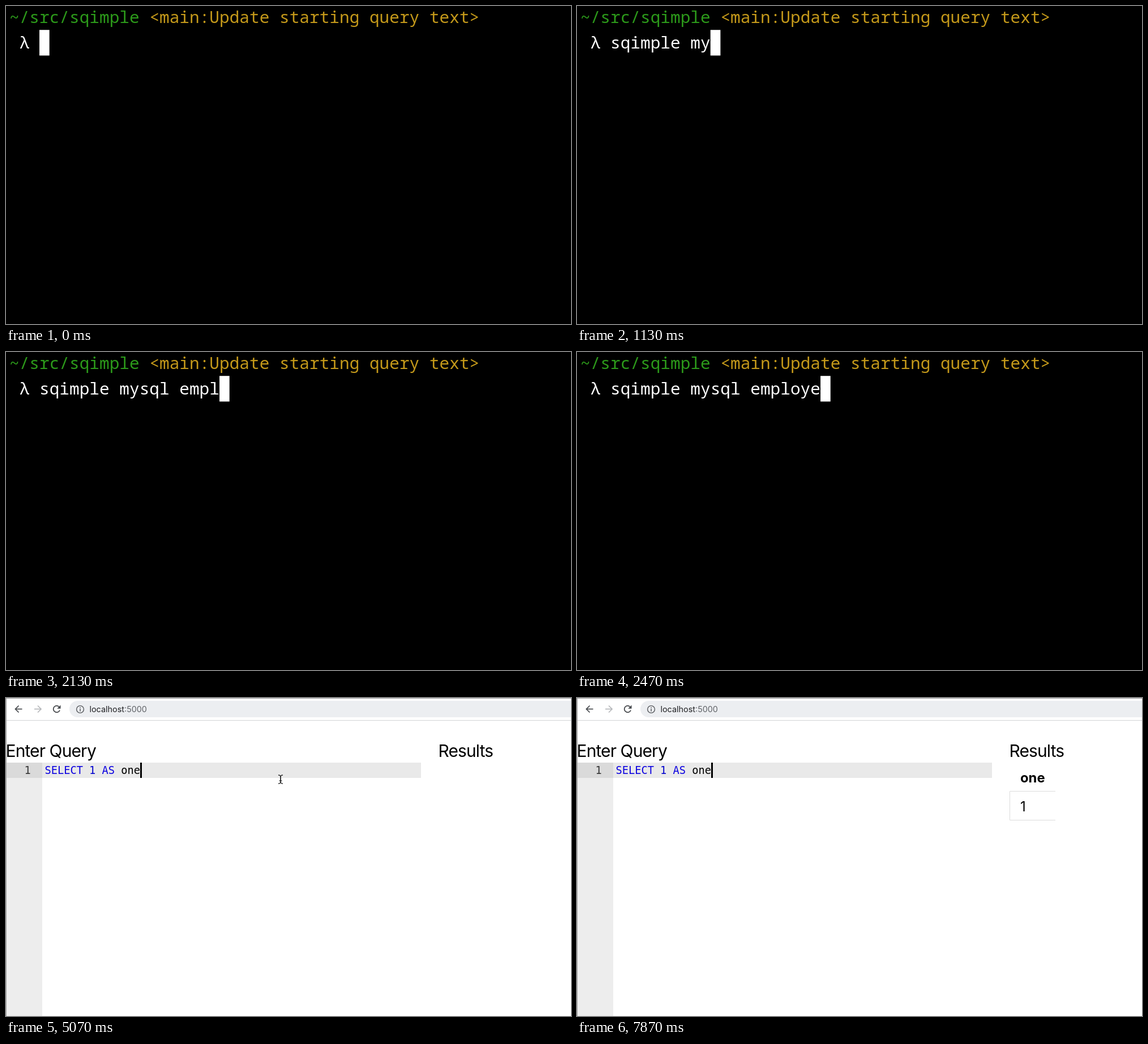
Write an HTML page with a canvas that moves like this. It is 998 px wide and 561 px high and loops after 8000 ms.

```html
<!DOCTYPE html>
<html lang="en">
<head>
<meta charset="utf-8">
<title>Terminal to browser</title>
<style>
  html, body { margin: 0; width: 100%; height: 100%; overflow: hidden; background: #000; }
  canvas { display: block; }
</style>
</head>
<body>
<canvas id="stage" width="998" height="561"></canvas>
<script>
const ctx = document.getElementById('stage').getContext('2d');
const W = 998, H = 561, LOOP = 8000;
const TERM = '29.45px "Noto Sans Mono", monospace';
const CODE = '18.67px "DejaVu Sans Mono", monospace';
const UI = 'Inter, sans-serif';

// Terminal grid
const COL = 17.67, ROW = 45.2, LEFT = 6;
const COMMAND = 'sqimple mysql employees';
// Moments at which the typed length grows: [ms, characters]
const KEYS = [
  [130, 1], [330, 2], [400, 3], [470, 4], [530, 5],
  [670, 6], [730, 7], [800, 8],
  [1000, 9], [1130, 10], [1200, 11], [1270, 12], [1400, 13], [1530, 15],
  [1870, 16], [2000, 17], [2130, 18],
  [2270, 19], [2400, 20], [2470, 21], [2670, 22], [2800, 23]
];
const ENTER = 3070, BROWSER = 5070;
const CARET_OFF = 7270, RESULT = 7330, CARET_ON = 7800;
const MOUSE_GO = 7670, MOUSE_GONE = 7870, MOUSE_STEP = 66;

function rect(x, y, w, h, color) {
  ctx.fillStyle = color;
  ctx.fillRect(x, y, w, h);
}

function text(str, x, y, font, color, tracking = 0) {
  ctx.font = font;
  ctx.fillStyle = color;
  ctx.letterSpacing = tracking + 'px';
  ctx.fillText(str, x, y);
}

function line(points, color, width) {
  ctx.strokeStyle = color;
  ctx.lineWidth = width;
  ctx.beginPath();
  points.forEach(([x, y], i) => i ? ctx.lineTo(x, y) : ctx.moveTo(x, y));
  ctx.stroke();
}

function cells(str, col, row, color = '#fff') {
  text(str, LEFT + col * COL, 29.7 + row * ROW, TERM, color);
}

function block(col, row) {
  rect(LEFT + col * COL, 42.2 + (row - 1) * ROW, COL, ROW, '#fff');
}

function terminal(t) {
  rect(0, 0, W, H, '#000');
  cells('~/src/sqimple', 0, 0, '#2c9a1a');
  cells('<main:Update starting query text>', 14, 0, '#c4991a');
  cells('λ', 1, 1);
  const typed = KEYS.reduce((n, [at, count]) => t >= at ? count : n, 0);
  cells(COMMAND.slice(0, typed), 3, 1);
  if (t < ENTER) {
    block(3 + typed, 1);
    return;
  }
  cells('Starting Up!', 3, 3);
  cells('Visit http:', 3, 5);
  cells('/', 14.2, 5);
  cells('/', 14.8, 5);
  cells('localhost:5000 in your browser.', 16, 5);
  cells('Press Ctrl–C to exit.', 3, 6);
  block(0, 8);
}

function arrow(x, dir, color) {
  line([[x - 6 * dir, 19.5], [x + 6 * dir, 19.5]], color, 1.7);
  line([[x, 13.5], [x + 6 * dir, 19.5], [x, 25.5]], color, 1.7);
}

function toolbar() {
  arrow(22.5, -1, '#45484c');
  arrow(56, 1, '#b5b7ba');

  ctx.strokeStyle = '#45484c';
  ctx.lineWidth = 1.8;
  ctx.beginPath();
  ctx.arc(89.5, 19.5, 5.8, 0.35, Math.PI * 1.75);
  ctx.stroke();
  ctx.fillStyle = '#45484c';
  ctx.beginPath();
  ctx.moveTo(96.5, 12.5);
  ctx.lineTo(96.5, 18.8);
  ctx.lineTo(90.2, 18.8);
  ctx.fill();

  ctx.fillStyle = '#eceef1';
  ctx.beginPath();
  ctx.roundRect(112, 5, W, 29, 14.5);
  ctx.fill();

  ctx.strokeStyle = '#55585c';
  ctx.lineWidth = 1.4;
  ctx.beginPath();
  ctx.arc(131, 20, 6.4, 0, Math.PI * 2);
  ctx.stroke();
  rect(130.3, 16.3, 1.5, 1.6, '#55585c');
  rect(130.3, 19, 1.5, 4.6, '#55585c');

  const font = '14.4px ' + UI;
  text('localhost', 147.5, 25, font, '#202124');
  const port = 147.5 + ctx.measureText('localhost').width;
  text(':5000', port, 25, font, '#606368');
  rect(0, 39, W, 1, '#d2d3d5');
}

function editor(caret) {
  rect(0, 114, 64, H - 114, '#ededed');
  rect(0, 114, 64, 27, '#dadada');
  rect(64, 114, 669, 27, '#e9e9e9');
  text('1', 32.5, 134, CODE, '#333');
  text('SELECT', 68.5, 134, CODE, '#0c00e0');
  const cell = ctx.measureText('0').width;
  text('1', 68.5 + 7 * cell, 134, CODE, '#0000cd');
  text('AS', 68.5 + 9 * cell, 134, CODE, '#0c00e0');
  text('one', 68.5 + 12 * cell, 134, CODE, '#000');
  if (caret) rect(237, 114, 3, 27, '#000');
}

function beam(x, y) {
  const half = side => line([
    [x + 4 * side, y - 7.5], [x + 1.5 * side, y - 7.2], [x, y - 5.5],
    [x, y + 5.5], [x + 1.5 * side, y + 7.2], [x + 4 * side, y + 7.5]
  ], '#222', 1.3);
  half(-1);
  half(1);
  line([[x - 2.5, y + 2.5], [x + 2.5, y + 2.5]], '#222', 1.2);
}

function results() {
  text('one', 783, 148.5, 'bold 23.8px ' + UI, '#000');
  text('1', 783, 199.5, '24px ' + UI, '#000');
  line([[845, 164.5], [764.5, 164.5], [764.5, 215.5], [845, 215.5]], '#dcdcdc', 1);
}

function browser(t) {
  rect(0, 0, W, H, '#fff');
  toolbar();
  const heading = '30px ' + UI;
  text('Enter Query', -0.5, 104, heading, '#000', -0.9);
  text('Results', 763.5, 104, heading, '#000', -0.9);
  editor(t < CARET_OFF || t >= CARET_ON);
  if (t >= RESULT) results();
  rect(0, 0, W, 1, '#9a9a9a');
  rect(0, 0, 1, H, '#a6a6a6');

  // The pointer accelerates away and leaves on the right
  if (t < MOUSE_GONE) {
    const k = t < MOUSE_GO ? 0 : Math.min(3, 1 + Math.floor((t - MOUSE_GO) / MOUSE_STEP));
    beam(485 + 28 * k * k, 143.5 + 12 * k * k);
  }
}

function draw(now) {
  const t = now % LOOP;
  (t < BROWSER ? terminal : browser)(t);
  requestAnimationFrame(draw);
}
requestAnimationFrame(draw);
</script>
</body>
</html>
```
